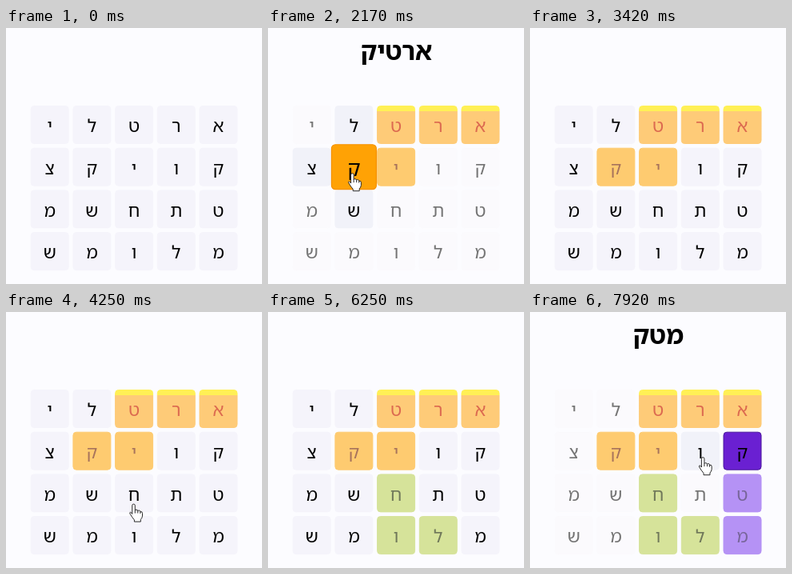
Animation, 320 px wide and 320 px high, one loop 8 s. Source, as an HTML page:

```html
<!DOCTYPE html>
<html lang="he">
<head>
<meta charset="utf-8">
<title>Word search</title>
<style>
  html, body { margin: 0; width: 100%; height: 100%; overflow: hidden; background: #fcfcff; }
  svg { display: block; width: 100vw; height: 100vh; }
  text { font-family: "Open Sans", "Noto Sans Hebrew", "Noto Sans", "DejaVu Sans", sans-serif; text-anchor: middle; }
  .letter { font-size: 22px; }
  .title { font-size: 31.5px; font-weight: 700; direction: rtl; }
</style>
</head>
<body>
<svg viewBox="0 0 320 320">
  <defs>
    <linearGradient id="sunlit" x2="0" y2="1">
      <stop offset=".14" stop-color="#fff055"/>
      <stop offset=".14" stop-color="#fecb78"/>
    </linearGradient>
  </defs>
  <g id="grid"></g>
  <text class="title" id="title" x="160.5" y="40"></text>
  <g id="hand" fill="#fff" stroke="#222" stroke-width="1.1" stroke-linejoin="round">
    <path d="M-2 2Q-2 0 0 0Q2 0 2 2V9Q2.5 7.5 4 8Q6 8 6 10Q6.5 8.7 8 9Q9.5 9.2 9.5 11Q12.5 10 12.5 13V17Q12 20 10 22V25H1V22.5Q-2 19-5 14Q-6 11.5-4.5 11.5Q-3 12-2 14Z"/>
    <path fill="none" d="M2 9v4M6 10v3M9.5 11v2.5"/>
  </g>
</svg>
<script>
const LOOP = 8000, STEP = 52.7, ENTER = 300, LEAVE = 400;
const ROWS = ["ילטרא", "צקיוק", "משחתט", "שמולמ"];
const MOVES = { L: [-1, 0], R: [1, 0], U: [0, -1], D: [0, 1] };

// A word begins at a cell and follows its route, one letter per gap.
const WORDS = [
  { col: 4, row: 0, route: "LLDL", start: 380, gap: 425, end: 2800,
    active: "#ffa205", edge: "#f59000", done: "#fecb70", ink: "#a8745c" },
  { col: 2, row: 2, route: "DR", start: 4300, gap: 520, end: 5950,
    active: "#b3c72b", edge: "#a6ba24", done: "#d6e39a", ink: "#70785a" },
  { col: 4, row: 3, route: "UUL", start: 6800, gap: 400, end: LOOP + LEAVE,
    active: "#6a20d2", edge: "#4b189c", done: "#b592f5", ink: "#78669a" }
];

const byId = id => document.getElementById(id);
const mix = (a, b, k) => a + (b - a) * k;
function ease(v) {
  v = Math.max(0, Math.min(1, v));
  return v * v * (3 - 2 * v);
}

function set(el, attrs) {
  for (const key in attrs) el.setAttribute(key, attrs[key]);
}
function add(parent, tag, attrs = {}) {
  const el = document.createElementNS("http://www.w3.org/2000/svg", tag);
  set(el, attrs);
  return parent.appendChild(el);
}

const cells = ROWS.flatMap((letters, row) => [...letters].map((letter, col) => {
  const group = add(byId("grid"), "g");
  const box = add(group, "rect", { x: -23.5, y: -23.5, width: 47, height: 47, rx: 4 });
  const label = add(group, "text", { class: "letter", y: 9.3 });
  label.textContent = letter;
  return { letter, col, row, group, box, label, x: 54.7 + col * STEP, y: 121 + row * STEP };
}));

for (const word of WORDS) {
  let { col, row } = word;
  word.cells = [cells[row * 5 + col]];
  for (const move of word.route) {
    col += MOVES[move][0];
    row += MOVES[move][1];
    word.cells.push(cells[row * 5 + col]);
  }
  word.cells.forEach((cell, i) => {
    const start = word.start + i * word.gap;
    const until = i < word.route.length ? start + word.gap : word.end;
    Object.assign(cell, { word, start, release: until - 150 });
  });
}

function drawCell(cell, t, current) {
  const { word, start, release } = cell;
  const near = current && Math.abs(cell.col - current.col) + Math.abs(cell.row - current.row) === 1;
  let fill = "#f5f4fb", edge = "none", ink = "#000", weight = 400, scale = 1;

  if (cell === current) {
    fill = word.active;
    edge = word.edge;
    scale += 0.19 * ease((t - start) / 80) * (1 - ease((t - release) / 70));
  } else if (word && t >= start) {
    fill = cell.row ? word.done : "url(#sunlit)";
    ink = cell.row ? word.ink : "#dc6a50";
  } else if (near) {
    fill = "#f1f2f9";
    weight = 500;
  } else if (current) {
    fill = "#fbfafd";
    ink = "#747474";
  }
  set(cell.group, { transform: `translate(${cell.x} ${cell.y}) scale(${scale})` });
  set(cell.box, { fill, stroke: edge === "none" ? fill : edge });
  set(cell.label, { fill: ink, "font-weight": weight });
}

function drawHand(t) {
  const word = WORDS.find(w => t >= w.start - ENTER && t < w.end + LEAVE);
  set(byId("hand"), { visibility: word ? "visible" : "hidden" });
  if (!word) return;

  const first = word.cells[0], last = word.cells[word.cells.length - 1];
  const i = Math.floor((t - word.start) / word.gap);
  let from = word.cells[i] || last, to = word.cells[i + 1] || last;
  let k = (t - word.start) / word.gap - i;
  if (t < word.start) {
    from = { x: first.x + 20, y: first.y + 80 };
    k = 1 - (word.start - t) / ENTER;
    to = first;
  } else if (t >= word.end) {
    to = { x: last.x + 20, y: 325 };
    k = (t - word.end) / LEAVE;
  }
  k = ease(k);
  set(byId("hand"), { transform: `translate(${mix(from.x, to.x, k) - 2} ${mix(from.y, to.y, k) + 8}) scale(.88)` });
}

let raised = null;
function draw(now) {
  const t = now % LOOP;
  const word = WORDS.find(w => t >= w.start && t < w.end);
  const chosen = word ? word.cells.filter(cell => t >= cell.start) : [];
  const current = chosen[chosen.length - 1];
  byId("title").textContent = chosen.map(cell => cell.letter).join("");
  cells.forEach(cell => drawCell(cell, t, current));
  if (current && current !== raised) {
    byId("grid").appendChild(current.group);
    raised = current;
  }
  drawHand(t);
}

const began = performance.now();
function tick() {
  draw(performance.now() - began);
  requestAnimationFrame(tick);
}
tick();
</script>
</body>
</html>
```
